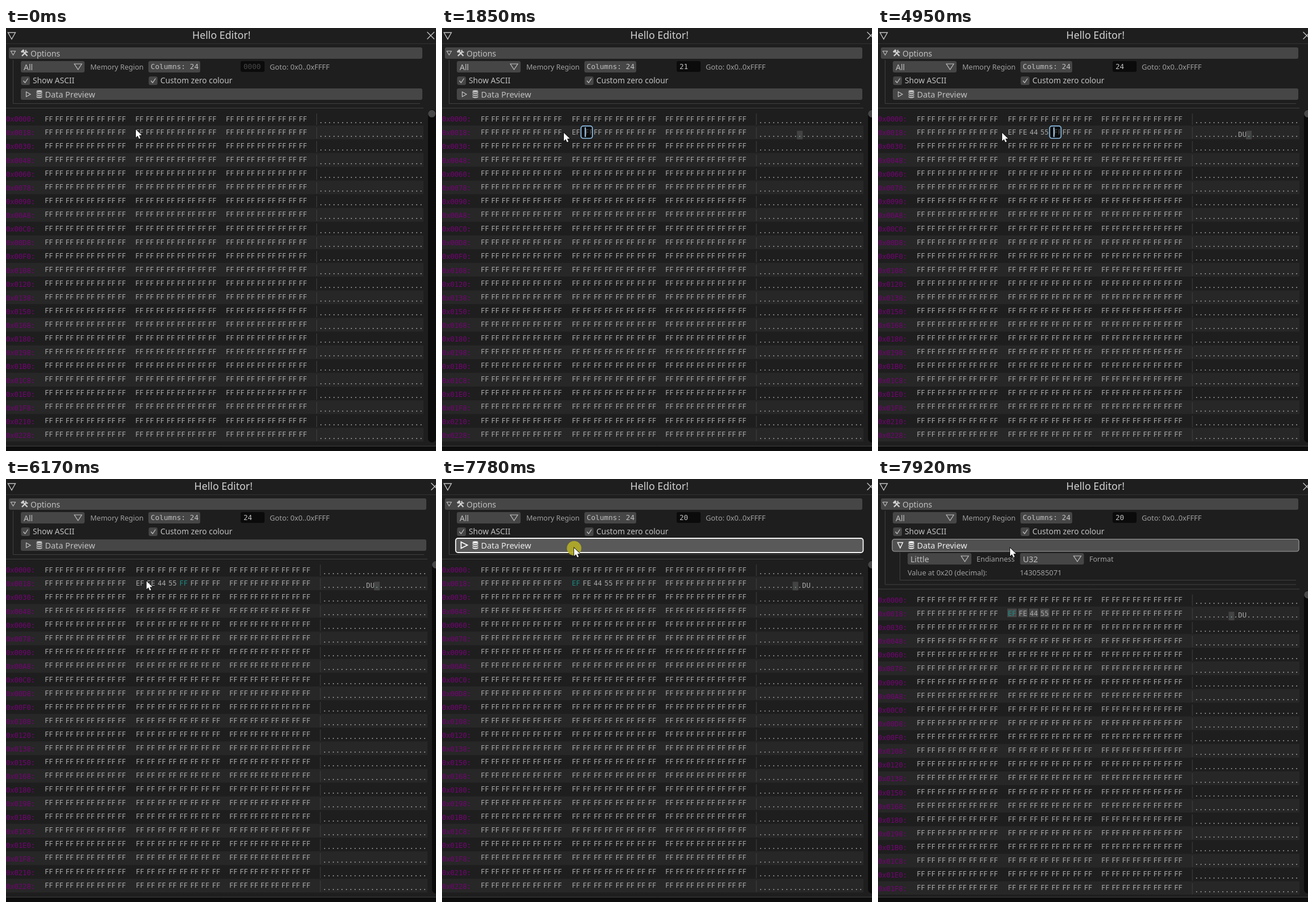
Animation of 755 by 742 pixels, one loop 8000 ms. Source, as an HTML page with a canvas:

```html
<!DOCTYPE html>
<html lang="en">
<head>
<meta charset="utf-8">
<title>Hello Editor!</title>
<style>
html, body { margin: 0; width: 100%; height: 100%; overflow: hidden; background: #1e1e1e; }
canvas { display: block; }
</style>
</head>
<body>
<canvas id="stage" width="755" height="742"></canvas>
<script>
const c = document.getElementById('stage').getContext('2d');
const LOOP = 8000;
const SANS = '"Noto Sans", "Open Sans", sans-serif';
const MONO = '"DejaVu Sans Mono", monospace';
const BG = '#1e1e1e', STRIPE = '#272727', BTN = '#464646', LINE = '#404040';
const TEXT = '#c0c0c0', LABEL = '#a0a0a0', DATA = '#a6a6a6', TEAL = '#1b8a82';
const PITCH = 24.1, OPEN_HEIGHT = 52.6;

// time, active byte in row 1, typed text, editing
const edits = [
  [0, -1, '', 0], [480, 8, '', 1], [1770, 8, 'E', 1], [1850, 9, '', 1],
  [2390, 10, '', 1], [3400, 10, '4', 1], [3470, 10, '44', 1], [3550, 11, '', 1],
  [4090, 11, '5', 1], [4250, 12, '', 1], [5250, 12, '', 0], [7090, 8, '', 0]
];
const commits = { 8: [1850, 'EF'], 9: [2390, 'FE'], 10: [3550, '44'], 11: [4250, '55'] };

// pointer moves: start, end, steps, x, y
const moves = [
  [630, 780, 3, 228, 173], [860, 860, 1, 228, 175], [1320, 1540, 4, 214, 184],
  [4950, 4950, 1, 218, 184], [5020, 5400, 6, 246, 180], [5560, 5630, 2, 249, 179],
  [5780, 5780, 1, 250, 179], [6170, 6400, 4, 237, 180], [6560, 6790, 4, 232, 179],
  [7250, 7620, 6, 232, 121]
];
const presses = [[390, 480], [7020, 7090], [7700, 7850]];

function pointerAt(t) {
  let x = 228, y = 178;
  for (const [from, to, n, tx, ty] of moves) {
    if (t < from) break;
    const gap = n > 1 ? (to - from) / (n - 1) : 1;
    const p = Math.min(1, (Math.floor((t - from) / gap + 0.02) + 1) / n);
    x += (tx - x) * p;
    y += (ty - y) * p;
  }
  return [x, y];
}

function text(s, x, cy, size, color, font = SANS) {
  c.font = `${size}px ${font}`;
  c.fillStyle = color;
  c.fillText(s, x, cy + size * 0.36);
}

function box(x, y, x2, y2, fill, stroke, w = 1, r = 3) {
  c.beginPath();
  c.roundRect(x, y, x2 - x, y2 - y, r);
  if (fill) { c.fillStyle = fill; c.fill(); }
  if (stroke) { c.strokeStyle = stroke; c.lineWidth = w; c.stroke(); }
}

function path(points, color, w = 1, close = false) {
  c.beginPath();
  for (let i = 0; i < points.length; i += 2) c.lineTo(points[i], points[i + 1]);
  if (close) c.closePath();
  c.strokeStyle = color;
  c.lineWidth = w;
  c.stroke();
}

function triDown(x, y, w, h, color, lw = 1.4) {
  path([x, y, x + w, y, x + w / 2, y + h], color, lw, true);
}

function triRight(x, y, w, h, color, lw) {
  path([x, y, x + w, y + h / 2, x, y + h], color, lw, true);
}

function combo(x, y, s) {
  box(x, y, x + 112, y + 20, BTN);
  text(s, x + 5, y + 10.5, 14, TEXT);
  triDown(x + 94, y + 5, 13, 10, TEXT, 1.2);
}

function checkbox(x, s) {
  box(x, 85, x + 15.5, 100, BTN);
  path([x + 4, 92.5, x + 7, 96, x + 12, 88.5], TEXT, 1.3);
  text(s, x + 20.5, 92.5, 13.8, TEXT);
}

function toolsIcon() {
  path([30, 41, 37.5, 49], '#d0d0d0', 2.4);
  path([27, 42.5, 31.5, 38.5], '#d0d0d0', 3.4);
  path([28, 49, 36, 41], '#d0d0d0', 2.4);
  path([34.5, 38.5, 35, 42, 38.5, 42.5], '#d0d0d0', 2);
}

function storeIcon(color) {
  c.fillStyle = color;
  c.beginPath();
  c.ellipse(58.5, 111, 5, 2.1, 0, 0, 7);
  c.fill();
  for (const y of [112.6, 116, 119.4]) {
    c.beginPath();
    c.moveTo(53.5, y);
    c.quadraticCurveTo(58.5, y + 3.4, 63.5, y);
    c.lineTo(63.5, y + 2);
    c.quadraticCurveTo(58.5, y + 5.4, 53.5, y + 2);
    c.fill();
  }
}

function drawTop(t, shift, active) {
  triDown(3.5, 8, 13, 11.5, TEXT);
  text('Hello Editor!', 327 + shift / 2, 13, 17.8, '#d2d2d2');
  const x = 739.5 + shift;
  path([x, 7, x + 12.5, 19.5], TEXT, 1.4);
  path([x, 19.5, x + 12.5, 7], TEXT, 1.4);
  path([0, 27.5, 755, 27.5], '#333', 1);

  box(5, 34, 731 + shift, 54, BTN);
  triDown(8.5, 40.5, 8, 7, TEXT, 1.1);
  toolsIcon();
  text('Options', 43, 44.5, 14, TEXT);

  combo(26, 58, 'All');
  text('Memory Region', 148, 68, 12.5, LABEL);
  box(250, 58, 341, 78, BTN);
  text('Columns: 24', 254, 67.5, 12.7, TEXT, MONO);
  box(412, 58, 454, 77, '#0b0b0b');
  if (active < 0) text('0000', 417, 67.8, 12.6, '#484848', MONO);
  else text((24 + active).toString(16).toUpperCase(), 417, 67.8, 12.6, TEXT, MONO);
  text('Goto: 0x0..0xFFFF', 463, 68, 12.8, LABEL);
  checkbox(26.5, 'Show ASCII');
  checkbox(250.5, 'Custom zero colour');
}

function drawPreview(t, shift, open) {
  const right = 731 + shift, drop = OPEN_HEIGHT * open;
  path([12.5, 56, 12.5, 132.5 + drop, right - 4, 132.5 + drop], LINE);
  path([0, 140.5 + drop, right + 2, 140.5 + drop], LINE);

  const hover = t >= 7550, press = t >= 7700 && t < 7850;
  const ink = hover ? '#ededed' : TEXT;
  if (press) box(24, 104, right + 1.5, 129, '#595959', '#f4f4f4', 1.8, 4);
  else if (hover) box(25, 105.5, right + 1, 127, '#505050', '#a0a0a0', 1.2, 4);
  else box(26, 106, right, 126, BTN);
  if (open) triDown(34.5, 111.5, 9, 9.5, ink, 1.5);
  else if (press) triRight(33.5, 110.5, 11, 11, '#fff', 1.8);
  else triRight(35.5, 112, 7.5, 8.5, ink, 1.2);
  storeIcon(ink);
  text('Data Preview', 68.5, 116.5, 14.4, ink);

  if (!open) return;
  c.save();
  c.beginPath();
  c.rect(0, 128, 755, drop);
  c.clip();
  path([38.5, 129, 38.5, 177.5, right - 4, 177.5], LINE);
  combo(52, 130, 'Little');
  text('Endianness', 173, 140.5, 12.5, LABEL);
  combo(249.5, 130, 'U32');
  text('Format', 371, 140.5, 12.5, LABEL);
  text('Value at 0x20 (decimal):', 52, 164.5, 12.6, LABEL);
  text('1430585071', 249, 164.5, 12.9, LABEL);
  c.restore();
}

function byteX(i, wide) {
  const col = i % 8;
  if (i < 8) return 68 + col * 18.29;
  if (i < 16) return wide ? 228 + col * 19.1 : 227 + col * 18.29;
  return (wide ? 392 : 386) + col * 18.29;
}

function editCell(x, cy, typed) {
  box(x - 3, cy - 10.8, x + 17, cy + 10.8, '#0a0a0a', '#8fc1ea', 1.7, 4);
  c.save();
  c.beginPath();
  c.rect(x - 2, cy - 10, 18.2, 20);
  c.clip();
  text(typed || 'FF', x + 4, cy, 12.1, typed ? '#c4c4c4' : '#505050', MONO);
  c.fillStyle = '#a9d3f5';
  c.fillRect(x + 3.5 + typed.length * 7.3, cy - 8.5, 2, 17);
  c.restore();
}

function drawRows(t, shift, open, [, active, typed, editing]) {
  const wide = shift > 0, dy = OPEN_HEIGHT * open;
  const asciiX = i => 553 + shift * 0.93 + i * 7.64;
  c.save();
  c.beginPath();
  c.rect(0, 141 + dy, 755, 588 - dy);
  c.clip();
  c.translate(0, dy);
  for (let row = 0; row < 24; row++) {
    const top = 147 + row * PITCH;
    const cy = row ? 182.7 + (row - 1) * 24.07 : 159.3;
    if (row % 2) {
      c.fillStyle = STRIPE;
      c.fillRect(0, top, 733 + shift, PITCH);
    }
    const address = (row * 24).toString(16).toUpperCase().padStart(4, '0');
    text(`0x${address}:`, 0, 159.8 + row * 24.13, 12.1, '#780078', MONO);
    path([545.5 + shift * 0.93, top + 3, 545.5 + shift * 0.93, top + 23], LINE);

    for (let i = 0; i < 24; i++) {
      const x = byteX(i, wide), here = row === 1;
      const done = here && commits[i] && t >= commits[i][0];
      const hex = done ? commits[i][1] : 'FF';
      const on = here && i === active;
      if (here && open && i > 7 && i < 12) {
        c.fillStyle = '#474747';
        c.fillRect(x - 1, cy - 8, 16.5, 15);
      }
      if (!(on && editing)) text(hex, x, cy, 12.1, on ? TEAL : DATA, MONO);

      const ax = asciiX(i), code = parseInt(hex, 16);
      const mark = code > 31 && code < 127 ? String.fromCharCode(code) : '.';
      if (on) {
        c.fillStyle = '#434343';
        c.fillRect(ax - 5, 180.3, 10, 15);
      }
      c.textAlign = 'center';
      text(mark, ax, 162.3 + row * PITCH, 12.3, on ? '#70a09c' : DATA, MONO);
      c.textAlign = 'left';
    }
    if (row === 1 && editing) editCell(byteX(active, wide), cy, typed);
  }
  c.restore();

  box(741 + shift, 143 + dy, 755 + shift, 727, '#0b0b0b', null, 1, 7);
  c.fillStyle = '#484848';
  c.beginPath();
  c.arc(747.7 + shift, 150.3 + dy, 6.5, 0, 7);
  c.fill();
}

function drawPointer(t) {
  const [x, y] = pointerAt(t);
  if (presses.some(([a, b]) => t >= a && t < b)) {
    c.fillStyle = 'rgba(176, 170, 40, .94)';
    c.beginPath();
    c.arc(x, y + 0.5, 12.7, 0, 7);
    c.fill();
  }
  c.save();
  c.translate(x, y);
  const arrow = [0, 0, 0, 14, 3.2, 11, 5.6, 16.3, 8, 15.2, 5.7, 10.2, 10.3, 10];
  path(arrow, '#111', 1.6, true);
  c.fillStyle = '#fff';
  c.fill();
  c.restore();
}

function draw(now) {
  const t = now % LOOP;
  const state = edits.filter(e => t >= e[0]).pop();
  const shift = t >= 1850 ? 7 : 0;
  const open = t >= 7920 ? 1 : t >= 7850 ? 0.5 : 0;
  c.fillStyle = BG;
  c.fillRect(0, 0, 755, 742);
  drawTop(t, shift, state[1]);
  drawPreview(t, shift, open);
  drawRows(t, shift, open, state);
  c.fillStyle = '#0d0d0d';
  c.fillRect(0, 734, 755, 8);
  path([0, 733.5, 755, 733.5], LINE);
  drawPointer(t);
}

const start = performance.now();
function tick() {
  draw(performance.now() - start);
  requestAnimationFrame(tick);
}
tick();
</script>
</body>
</html>
```
